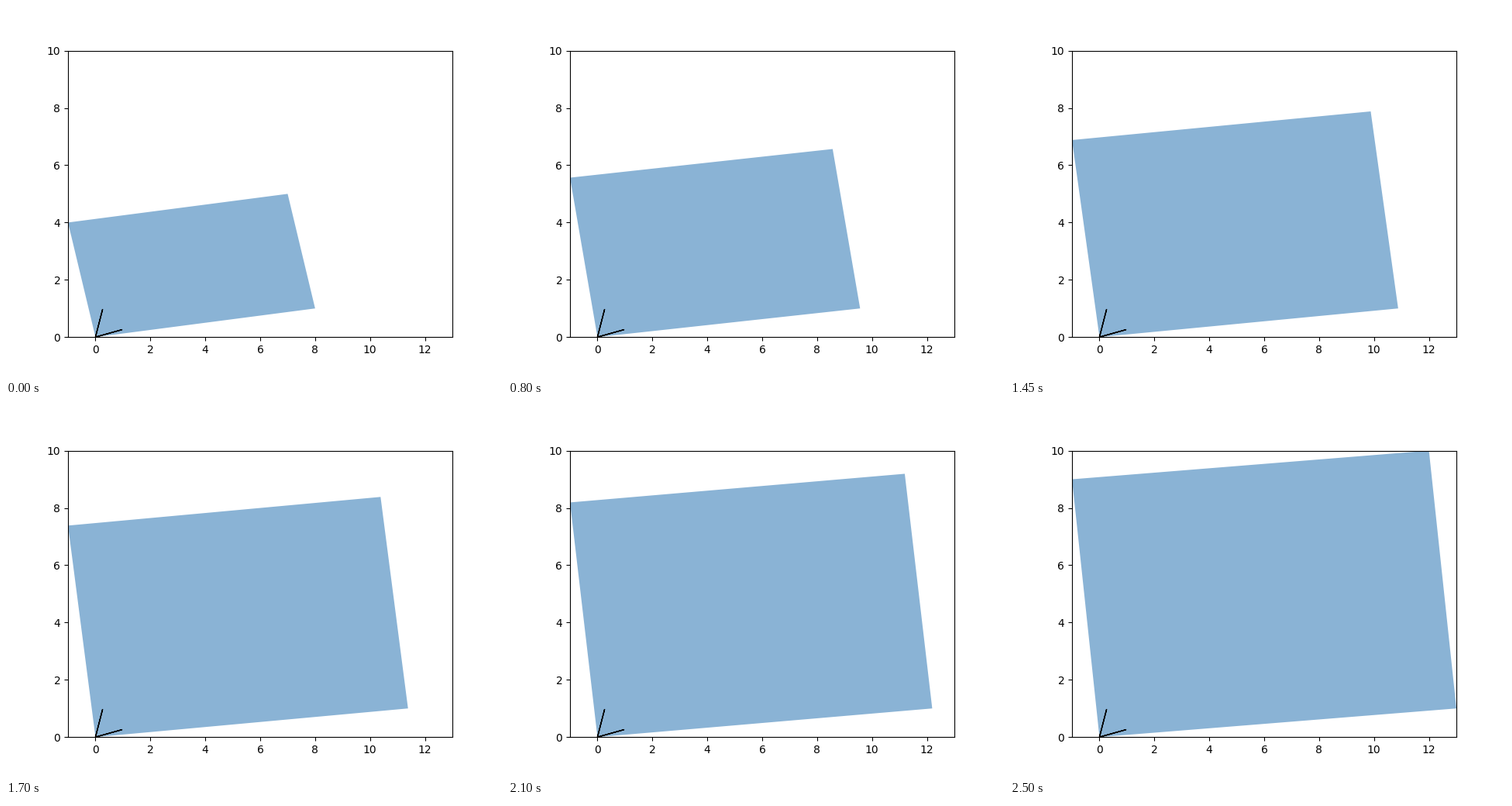
A matplotlib script for the animation above (2600 ms loop, 640 px wide and 480 px high).

```python
import numpy as np
import matplotlib.pyplot as plt
from matplotlib.animation import FuncAnimation

FRAMES = 52
INTERVAL = 50
STEPS = 99      # growth steps, two per drawn frame
GROWTH = 5

fig, ax = plt.subplots(figsize=(6.4, 4.8), dpi=100)
ax.set_xlim(-1, 13)
ax.set_ylim(0, 10)


def corners(s):
    """Parallelogram spanned by (8 + s, 1) and (-1, 4 + s)."""
    u = np.array([8 + s, 1])
    v = np.array([-1, 4 + s])
    return np.array([0 * u, u, u + v, v])


shape = plt.Polygon(corners(0), facecolor="#8ab3d5", edgecolor="none")
ax.add_patch(shape)

for angle in np.radians([15, 75]):
    ax.arrow(0, 0, np.cos(angle), np.sin(angle), color="black")


def update(i):
    step = min(max(2 * i - 1, 0), STEPS)
    shape.set_xy(corners(GROWTH * step / STEPS))
    return [shape]


anim = FuncAnimation(fig, update, frames=FRAMES, interval=INTERVAL,
                     repeat=True, repeat_delay=0)
plt.show()
```
